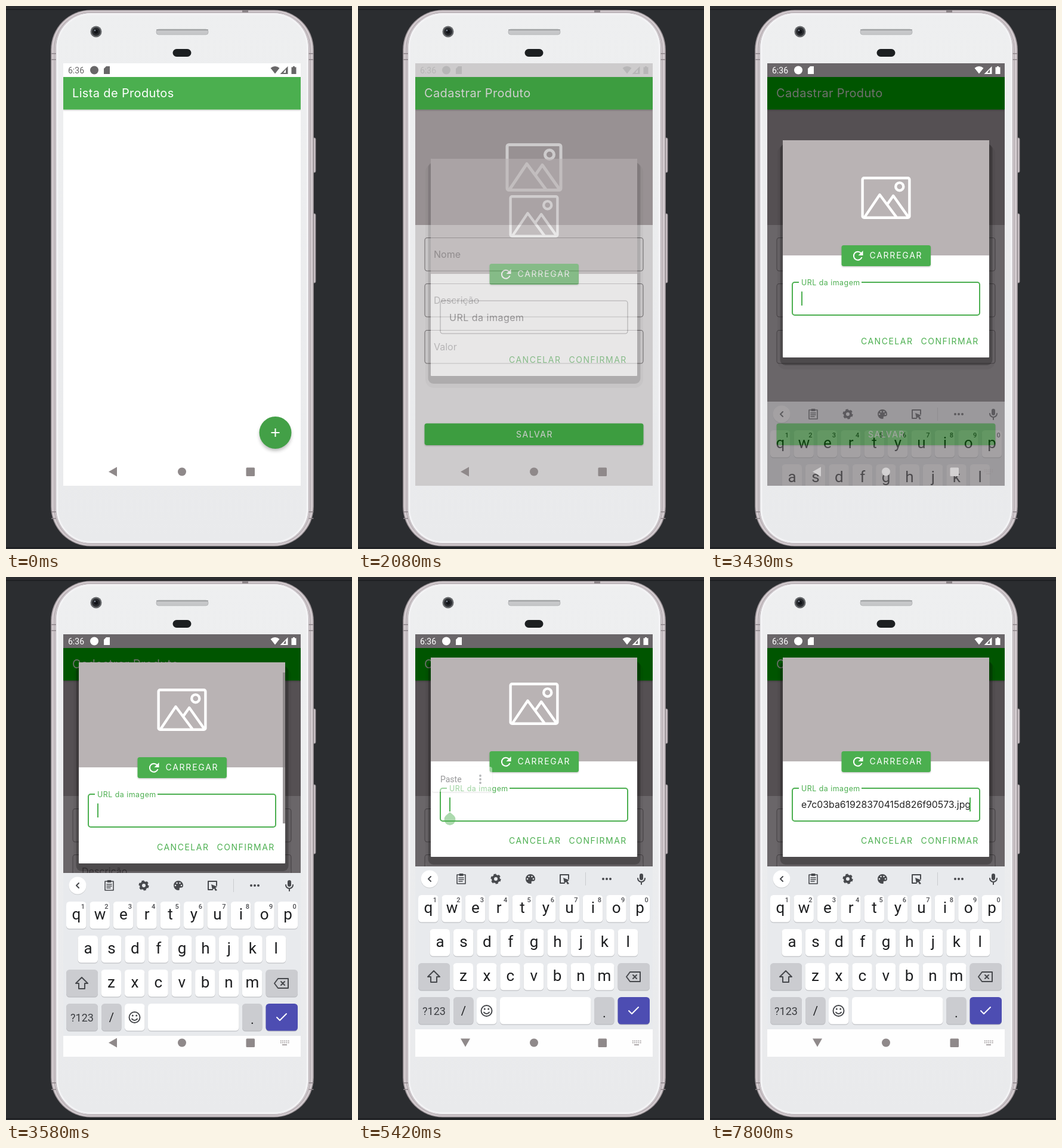
Animation, 580 px wide and 910 px high, one loop 8 s. Source, as an HTML page:

```html
<!DOCTYPE html>
<html lang="pt">
<head>
<meta charset="utf-8">
<title>Lista de Produtos</title>
<style>
  html, body { margin: 0; width: 100%; height: 100%; overflow: hidden; background: #2b2d30; }
  svg { display: block; width: 580px; height: 910px; }
  text { font: 16px Inter, "Open Sans", sans-serif; }
  .title { font-size: 20px; letter-spacing: .35px; }
  .btn { font-size: 14px; letter-spacing: 1.5px; }
  .load { letter-spacing: 1.75px; }
  .url { font-size: 15.8px; }
  .key, .small, .sys { font-family: Roboto, "Noto Sans", sans-serif; }
  .key { font-size: 26px; text-anchor: middle; fill: #1d1e20; }
  .small { font-size: 11px; font-weight: 500; text-anchor: middle; fill: #4b4c50; }
  .sys { font-size: 14px; }
  .line { fill: none; stroke-width: 2; stroke-linecap: round; stroke-linejoin: round; }
</style>
</head>
<body>
<svg id="stage" viewBox="0 0 580 910"></svg>
<script>
const GREEN = '#4caf50', GREY = '#b9b3b4';

const rect = (x, y, w, h, fill, r = 0, more = '') =>
  `<rect x="${x}" y="${y}" width="${w}" height="${h}" rx="${r}" fill="${fill}" ${more}/>`;
const circle = (x, y, r, fill, more = '') => `<circle cx="${x}" cy="${y}" r="${r}" fill="${fill}" ${more}/>`;
const text = (x, y, cls, s, more = '') => `<text x="${x}" y="${y}" class="${cls}" ${more}>${s}</text>`;
const line = (d, color, more = '') => `<path class="line" d="${d}" stroke="${color}" ${more}/>`;
const at = (x, y, body) => `<g transform="translate(${x} ${y})">${body}</g>`;

const pictureIcon = (x, y, scale) => `<g transform="translate(${x} ${y}) scale(${scale})"
  fill="none" stroke="#fff" stroke-width="5" stroke-linejoin="round">
  <rect x="-45" y="-38" width="90" height="76" rx="3"/><circle cx="26" cy="-21.5" r="7.5"/>
  <path d="M-41 37L-12-6L20 37M2 13L14-4L43 37"/></g>`;

function phone() {
  const shell = (inset, fill, more = '') =>
    rect(75 + inset, 6.5 + inset * .65, 441 - 2 * inset, 899 - 1.3 * inset, fill, 67 - inset, more);
  const seams = [79, 89, 847, 858].map(y =>
    rect(76, y, 8, 1.5, '#8d858a') + rect(507.5, y, 8, 1.5, '#8d858a')).join('');
  const sideKey = (y, h) => rect(514, y, 5, h, '#c9c1c5', 2, 'stroke="#8a8388"');
  return rect(0, 0, 580, 910, '#2b2d30') + rect(0, 5, 580, 1.5, '#1b1c1f') + rect(0, 907, 580, 1.5, '#1b1c1f')
    + sideKey(221, 58) + sideKey(348, 116)
    + shell(0, '#8f888c') + shell(1.5, '#d3cbcf') + shell(5.5, '#a0989d') + shell(6.5, '#d9d2d6')
    + shell(8, '#b0a8ad') + seams + rect(396, 7, 10, 4, '#8b8488')
    + shell(9, 'url(#face)') + shell(11, 'none', 'stroke="#f3f3f5" stroke-width="3"')
    + circle(151, 43, 9.5, '#65676a') + circle(151, 43, 7, '#2a2c30') + circle(151, 43, 3.5, '#111318') + circle(149, 41, 1.3, '#7b8494')
    + rect(252, 39, 87, 9, '#c6c7c9', 4, 'stroke="#aeb0b2" stroke-width=".8"') + rect(252, 39, 87, 2, '#a0a2a4', 1)
    + rect(279.5, 72, 31, 13, '#1c1f21', 6.5);
}

const bar = fill => rect(96, 119, 398, 54.5, fill, 0, 'filter="url(#soft)"');

const listPage = () => `<g id="list">${rect(96, 96, 398, 708, '#fff')}${bar(GREEN)}
  ${text(111, 153, 'title', 'Lista de Produtos', 'fill="#fff"')}
  <circle id="fabShadow" cx="451.5" r="26" filter="url(#blur)"/>
  ${circle(451.5, 715, 27, '#43a047')}${circle(451.5, 715, 27, '#fff', 'id="fabRipple"')}
  ${rect(444.5, 714, 14, 2, '#fff')}${rect(450.5, 708, 2, 14, '#fff')}</g>
  ${rect(96, 96, 398, 708, '#000', 0, 'id="listDim"')}`;

function formPage() {
  const fields = [['Nome', 388.5], ['Descrição', 465.5], ['Valor', 543.5]].map(([label, y]) =>
    rect(112, y, 366, 55.5, 'none', 4, 'stroke="#858384" stroke-width="1.1"')
    + text(127, y + 33.5, '', label, 'fill="#6f6d6e"')).join('');
  return `<g id="form">${rect(96, 96, 398, 708, '#fff')}${rect(96, 173, 398, 194, GREY)}${pictureIcon(295, 270.5, 1)}${fields}
    ${rect(96, 96, 398, 708, 'rgb(46,40,44)', 0, 'id="dim"')}
    <g id="greens">${bar('inherit')}${rect(111.5, 699.5, 367, 36.5, 'inherit', 4, 'filter="url(#soft)"')}</g>
    <g id="onGreen">${text(111, 153, 'title', 'Cadastrar Produto')}${text(296, 723, 'btn', 'SALVAR', 'text-anchor="middle"')}</g></g>`;
}

const dialog = () => `<g id="dialog">
  ${rect(113, 8, 365, 0, '#000', 14, 'id="farShadow" opacity=".05"')}
  ${rect(117.5, 6, 356, 0, '#000', 9, 'id="nearShadow" opacity=".24"')}
  <g clip-path="url(#dialogClip)">${rect(122, 0, 346, 370, '#fff')}
    <g id="scroll">${rect(122, 0, 346, 193, GREY)}<g id="placeholder">${pictureIcon(295, 96.5, .875)}</g>
      ${rect(220.5, 176, 149.5, 35, GREEN, 3.5, 'filter="url(#soft)"')}
      <g clip-path="url(#loadClip)">${circle(295, 193, 76, '#fff', 'id="loadRipple"')}</g>
      ${line('M253 189A7 7 0 1 0 254.5 196', '#fff', 'style="stroke-linecap:butt"')}<path d="M256.5 185v8h-8z" fill="#fff"/>
      ${text(267.5, 198, 'btn load', 'CARREGAR', 'fill="#fff"')}
      <rect id="field" x="138" y="238" width="314" height="55" rx="4" fill="none"/>
      <rect id="notch" y="236" height="4" fill="#fff"/>
      <text id="label" x="153" letter-spacing=".5">URL da imagem</text>
      <g clip-path="url(#urlClip)">${text(437, 271, 'url', '4e7c03ba61928370415d826f90573.jpg', 'id="url" text-anchor="end" fill="#242424"')}</g>
      <rect id="cursor" y="253.5" width="2" height="23.5" fill="${GREEN}"/>
    </g>
    <g id="actions" fill="${GREEN}">${text(253, 0, 'btn', 'CANCELAR')}${text(353.5, 0, 'btn', 'CONFIRMAR')}</g>
    ${rect(464, 17, 4, 253, '#858182', 0, 'id="scrollbar"')}
  </g></g>`;

const pasteMenu = () => `<g id="paste">
  ${rect(124, 318, 101, 42, '#fff', 4, 'filter="url(#soft)"')}
  ${text(138, 344, 'sys', 'Paste', 'fill="#202124" font-weight="500"')}
  ${[333, 339, 345].map(y => circle(205, y, 1.9, '#5f6368')).join('')}
  <path d="M154 394l7 6a9.5 9.5 0 1 1-14 0z" fill="${GREEN}"/></g>`;

function keyboard() {
  const PITCH = 39.4, INK = '#47494d', SIDE = '#cbccd0';
  const cap = (x, y, w, fill = '#fff') => rect(x, y + 1, w, 45.5, '#b4b6ba', 5.5) + rect(x, y, w, 45.5, fill, 5.5);
  const row = (letters, x0, y) => [...letters].map((c, i) => {
    const x = x0 + i * PITCH;
    return cap(x, y, 33.5) + text(x + 17, y + 30, 'key', c)
      + (letters.length === 10 ? text(x + 28, y + 12, 'small', (i + 1) % 10) : '');
  }).join('');
  const gear = circle(0, 0, 5, 'none', `stroke="${INK}" stroke-width="4"`)
    + circle(0, 0, 7.4, 'none', `stroke="${INK}" stroke-width="2.4" stroke-dasharray="4.2 3.55"`);
  const palette = `<path d="M0-8a8 8 0 1 0 0 16c3 0 1-3 2-4s6 1 6-4a8 8 0 0 0-8-8z" fill="${INK}"/>`
    + [[-5, 0], [-2.5, -4], [2.5, -4], [5, 0]].map(([x, y]) => circle(x, y, 1.3, '#e8eaed')).join('');
  const strip = circle(120, 507, 14.5, '#c9cbce') + circle(120, 506, 14.5, '#fff') + line('M122 502l-4 4l4 4', INK)
    + at(173, 506, line('M-7-7H7V8H-7zM-4-2H4M-4 1H4M-4 4H2', INK, 'style="stroke-width:1.6"') + rect(-3.5, -9, 7, 4, INK, 1))
    + at(231, 506, gear) + at(289, 506, palette)
    + at(346, 506, line('M0 7H-7V-7H7V0', INK) + `<path d="M-2-2l10 4l-3 2l3 4l-3 1l-2-4l-3 2z" fill="${INK}"/>`)
    + rect(381, 495, 1, 22, '#c9cbce') + [411, 417, 423].map(x => circle(x, 506, 2, INK)).join('')
    + at(475, 506, rect(-3, -9, 6, 11, INK, 3) + line('M-6-1a6 6 0 0 0 12 0M0 5V9', INK));
  return `<g id="keyboard">${rect(96, 485, 398, 320, '#e8eaed')}${strip}
    ${row('qwertyuiop', 101, 533)}${row('asdfghjkl', 120.5, 590)}${row('zxcvbnm', 159.5, 647)}
    ${cap(101, 647, 53, SIDE)}${cap(435.5, 647, 53.5, SIDE)}
    ${line('M127 660l10 10h-5v9h-10v-9h-5z', INK)}
    ${line('M456 662H473V678H456L450 670zM461 667l6 6M467 667l-6 6', INK)}
    ${cap(101, 704, 53, SIDE)}${text(127.5, 733.5, 'key', '?123', 'style="font-size:18px;fill:#3c3e42"')}
    ${cap(160, 704, 33.5, SIDE)}${text(177, 734, 'key', '/', 'style="font-size:20px"')}
    ${cap(199, 704, 33.5)}${circle(215.5, 727, 9, 'none', `stroke="${INK}" stroke-width="2"`)}
    ${circle(212.3, 724, 1.5, INK)}${circle(218.7, 724, 1.5, INK)}${line('M211 729.5q4.5 5 9 0', INK)}
    ${cap(238, 704, 152.5)}${cap(396, 704, 33.5, SIDE)}${text(413, 738, 'key', '.', 'style="font-size:22px"')}
    ${cap(435.5, 704, 53.5, '#4d4db2')}${line('M454 727l5 5l11-11', '#fff')}
    ${rect(96, 758, 398, 47, '#fefefe')}</g>`;
}

const systemBars = () => `<g id="status">${text(104, 113, 'sys', '6:36')}${circle(148, 107.5, 7, 'inherit')}
  <path d="M168 101h6v13h-10v-9z"/><path d="M451 113.5L443.5 104q7.5-6 15 0z"/>
  <path d="M472.5 101v13h-13zM469 106l-4 6h4z" fill-rule="evenodd"/><path d="M481 101h3v1.5h2.5v11.5h-8v-11.5h2.5z"/></g>
  <g id="nav"><path id="back" d="M172 780.5L186 772.5V788.5z"/>
  ${circle(295, 780.5, 7, 'inherit')}${rect(402.5, 773.5, 14.5, 14.5, 'inherit', 1.5)}</g>
  <g id="imeSwitch" fill="none" stroke="#8f898a" stroke-width="1.5">
  <path d="M460 777.5h15M460 780.5h15" stroke-dasharray="1.7 1.5"/><path d="M463 784h8"/></g>`;

const clip = (id, x, y, w, h, r = 0, rectId = '') =>
  `<clipPath id="${id}"><rect ${rectId} x="${x}" y="${y}" width="${w}" height="${h}" rx="${r}"/></clipPath>`;

document.getElementById('stage').innerHTML = `<defs>
  <linearGradient id="face" x2="0" y2="1"><stop stop-color="#eeeff0"/><stop offset="1" stop-color="#e9eaec"/></linearGradient>
  <filter id="soft" x="-20%" y="-20%" width="140%" height="160%">
    <feDropShadow dx="0" dy="1.2" stdDeviation="1.1" flood-opacity=".24"/></filter>
  <filter id="blur" x="-50%" y="-50%" width="200%" height="200%"><feGaussianBlur stdDeviation="3.2"/></filter>
  ${clip('screen', 96, 96, 398, 708)}${clip('dialogClip', 122, 0, 346, 364, 1, 'id="dialogBox"')}
  ${clip('loadClip', 220.5, 176, 149.5, 35, 3.5)}${clip('urlClip', 153, 245, 285, 40)}</defs>
  ${phone()}<g clip-path="url(#screen)">${listPage()}${formPage()}${dialog()}${keyboard()}${systemBars()}${pasteMenu()}</g>`;

const el = Object.fromEntries([...document.querySelectorAll('[id]')].map(n => [n.id, n]));
const set = (id, attrs) => { for (const k in attrs) el[id].setAttribute(k, attrs[k]); };
const show = (id, opacity) => {
  el[id].style.display = opacity > 0 ? '' : 'none';
  set(id, { opacity });
};
const span = (t, a, b) => Math.min(1, Math.max(0, (t - a) / (b - a)));
const easeOut = (p, power = 3) => 1 - (1 - p) ** power;
const mix = (a, b, p) => a + (b - a) * p;
const mixColor = (a, b, p) => `rgb(${a.map((v, i) => Math.round(mix(v, b[i], p)))})`;
const scaled = k => `translate(295 450) scale(${k}) translate(-295 -450)`;
const moveY = y => `translate(0 ${Math.round(y)})`;
const WHITE = [255, 255, 255];
const cursorOn = [[3090, 3710], [4310, 4760], [5300, 5840], [6260, 6840], [7380, 8000]];

function render(t) {
  // Floating button, then the form opens over the list
  const press = span(t, 400, 460);
  set('fabShadow', { cy: mix(719, 722, press), opacity: mix(.3, .38, press) });
  show('fabRipple', .2 * press * (1 - span(t, 630, 740)));
  const opening = t >= 915 ? easeOut(span(t, 880, 1190), 4.7) : 0;
  set('list', { transform: scaled(1 + .05 * opening) });
  show('listDim', .12 * opening);
  set('form', { transform: scaled(.85 + .15 * opening) });
  show('form', opening ? span(t, 870, 960) : 0);

  // Dialog fades in while the form dims
  const shown = t >= 2075;
  const dim = shown ? span(t, 2010, 2220) : 0;
  show('dim', .71 * dim);
  set('greens', { fill: mixColor([76, 175, 80], [0, 84, 0], dim ** 1.5) });
  set('onGreen', { fill: mixColor(WHITE, [112, 112, 110], dim) });
  show('dialog', shown ? span(t, 2010, 2140) : 0);

  // Keyboard pushes the dialog up and makes it scroll
  const rise = easeOut(span(t, 3403, 3703));
  const squeeze = span(rise, .3, 1), height = Math.round(364 - 30 * squeeze);
  set('dialog', { transform: moveY(256 - 121 * rise) });
  set('dialogBox', { height });
  set('nearShadow', { height: height + 7 });
  set('farShadow', { height: height + 12 });
  set('scroll', { transform: moveY(-19 * squeeze) });
  set('actions', { transform: `translate(0 ${height - 22.5})` });
  show('scrollbar', squeeze * (1 - span(t, 3905, 4160)) * .9);
  const slide = span(t, 3378, 3678), board = Math.min(1, slide * 2.2);
  set('keyboard', { transform: moveY(319 * (1 - easeOut(slide))) });
  show('keyboard', board);
  show('imeSwitch', board);

  // Text field
  const focus = easeOut(span(t, 3010, 3200), 2);
  set('field', { stroke: focus ? GREEN : '#929091', 'stroke-width': 1.1 + .9 * focus });
  set('notch', { x: mix(201, 149, focus), width: 105 * focus });
  set('label', { y: mix(272, 243, focus), fill: mixColor([111, 109, 110], [76, 175, 80], focus) });
  el.label.style.fontSize = mix(16, 12.4, focus) + 'px';
  const pasted = t >= 6260;
  show('url', pasted ? 1 : 0);
  set('cursor', { x: pasted ? 435 : 153 });
  show('cursor', cursorOn.some(([a, b]) => t >= a && t < b) ? 1 : 0);
  show('paste', span(t, 5270, 5600) * (1 - span(t, 6240, 6490)));

  // Load button
  const ripple = span(t, 7360, 7600);
  set('loadRipple', { r: 25 + 55 * easeOut(ripple) });
  show('loadRipple', ripple ? .24 * (1 - span(t, 7580, 7800)) : 0);
  show('placeholder', t < 7560 ? 1 : 0);

  // System bars
  set('status', { fill: mixColor([104, 103, 104], WHITE, span(dim, 0, .65)) });
  set('nav', { fill: mixColor([143, 137, 138], WHITE, span(dim, .4, 1) * (1 - board)) });
  set('back', { transform: `rotate(${-90 * easeOut(span(t, 3920, 4160), 2)} 179.5 780)` });
}

function tick(now) {
  render(now % 8000);
  requestAnimationFrame(tick);
}
render(0);
requestAnimationFrame(tick);
</script>
</body>
</html>
```
